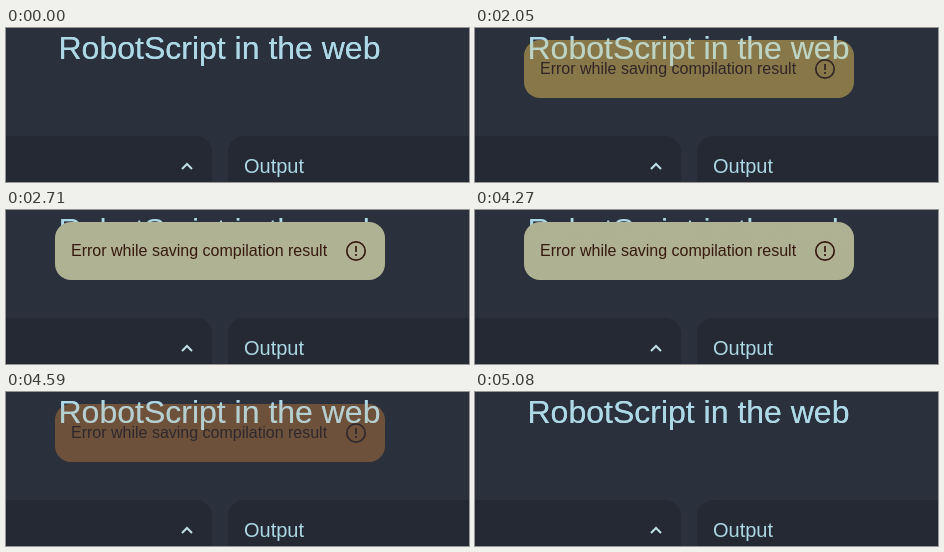
An HTML page for the animation above (5340 ms loop, 463 by 154 pixels).

```html
<!DOCTYPE html>
<html lang="en">
<head>
<meta charset="utf-8">
<title>Toast notification</title>
<style>
  html, body { margin: 0; width: 100%; height: 100%; overflow: hidden; background: #2a303c; }
  svg { display: block; font-family: "Liberation Sans", Arial, sans-serif; }
</style>
</head>
<body>
<svg width="463" height="154" viewBox="0 0 463 154">
  <rect width="463" height="154" fill="#2a303c"/>
  <g fill="#242933">
    <rect x="-40" y="108" width="246" height="80" rx="16"/>
    <rect x="222" y="108" width="300" height="80" rx="16"/>
  </g>
  <g fill="#add8e6">
    <text id="title" x="52.5" y="31" font-size="32">RobotScript in the web</text>
    <text x="238" y="145" font-size="20">Output</text>
  </g>
  <path d="M176 141l5-5 5 5" fill="none" stroke="#c0dfe8" stroke-width="2"/>
  <g id="toast" opacity="0">
    <rect id="card" x="49" y="12" width="330" height="58" rx="16"/>
    <text x="65" y="46" font-size="16" fill="#37190f">Error while saving compilation result</text>
    <g fill="none" stroke="#37190f" stroke-width="1.7">
      <circle cx="350" cy="41" r="9.2"/>
      <path d="M350 36v6M350 44v2"/>
    </g>
  </g>
  <use id="glow" href="#title" fill="#add8e6"/>
</svg>
<script>
const LOOP = 5340, FADE = 850;
const [toast, card, glow] = ['toast', 'card', 'glow'].map(id => document.getElementById(id));

// Card colour by visibility: red, orange, yellow, khaki.
const stops = [
  [0, 230, 10, 10],
  [0.35, 238, 149, 60],
  [0.45, 246, 202, 87],
  [1, 176, 178, 148]
];

// The CSS "ease" curve, solved by bisection.
function ease(x) {
  if (x <= 0) return 0;
  if (x >= 1) return 1;
  let lo = 0, hi = 1;
  for (let i = 0; i < 24; i++) {
    const u = (lo + hi) / 2;
    if (0.75 * u * (1 - u) + u ** 3 < x) lo = u; else hi = u;
  }
  return 0.3 * lo * (1 - lo) ** 2 + 3 * lo * lo * (1 - lo) + lo ** 3;
}

function visibility(t) {
  if (t < 1880 || t >= 5080) return 0;
  if (t < 2710) return ease((t - 1815) / FADE);
  return 1 - ease((t - 4265) / FADE);
}

function cardColor(v) {
  const i = Math.max(1, stops.findIndex(s => s[0] >= v));
  const a = stops[i - 1], b = stops[i];
  const k = (v - a[0]) / (b[0] - a[0]);
  const rgb = [1, 2, 3].map(c => Math.round(a[c] + (b[c] - a[c]) * k));
  return `rgb(${rgb})`;
}

const start = performance.now();
function draw() {
  const v = visibility((performance.now() - start) % LOOP);
  toast.setAttribute('opacity', v);
  card.setAttribute('fill', cardColor(v));
  // The title keeps shining through while the card is translucent.
  glow.setAttribute('opacity', 1 - v);
  requestAnimationFrame(draw);
}
draw();
</script>
</body>
</html>
```
